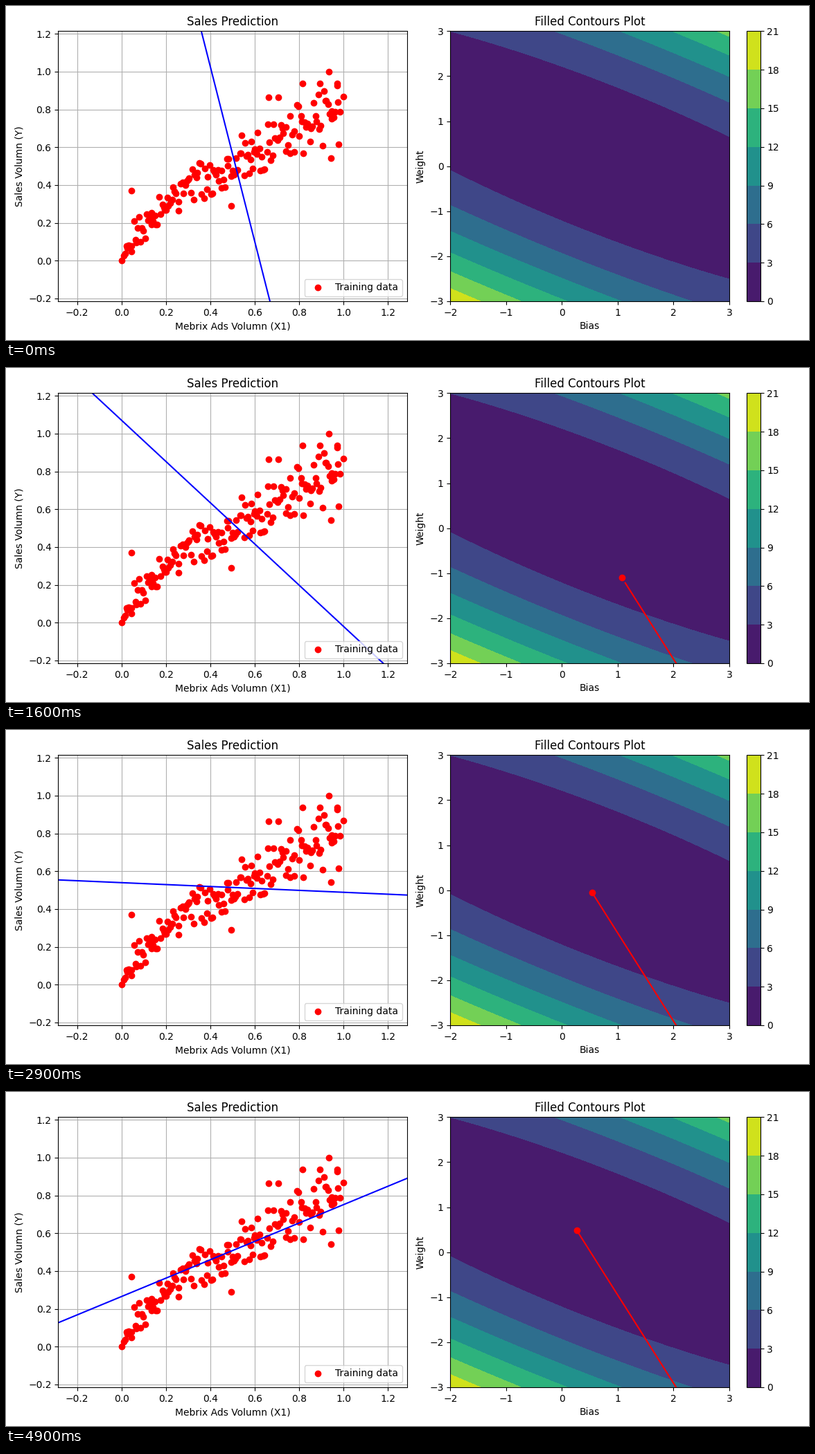
Recreate the animation shown at these times as a matplotlib script. Size 1159x483 px, loop 5 s.

```python
import numpy as np
import matplotlib.pyplot as plt
from matplotlib.animation import FuncAnimation

W, H, DPI = 1159, 483, 100
FRAMES, INTERVAL = 50, 100

# Gradient descent: both parameters decay towards the best fit
W_END, B_END = 0.667, 0.173
W_GAP, RATE, B_PER_W = 5.287, 0.06885, 0.511

# Samples at the rim of the cloud
LANDMARKS = [(0, 0), (.045, .372), (.495, .291), (.592, .489), (.664, .863),
             (.705, .866), (.817, .936), (.895, .936), (.933, 1),
             (.973, .936), (1, .868), (.945, .544), (.977, .617)]


def make_samples(n=152):
    """Evenly jittered x, y scattered around a rising power curve."""
    rng = np.random.default_rng(7)
    x = .005 + .98 * (np.arange(n) + rng.random(n)) / n
    noise = np.clip(rng.normal(size=n), -1.6, 1.6)
    y = .8 * x ** .62 + (.045 + .05 * x) * noise
    return np.vstack([LANDMARKS, np.column_stack([x, y])])


def params(step):
    gap = W_GAP * np.exp(-RATE * np.asarray(step, float))
    return B_END + B_PER_W * gap, W_END - gap


def loss(u, v):
    return (v - .5 + .475 * u) ** 2 + .085 * u ** 2 - .11 * u + .05


def add_axes(left, right, top=36.4, bottom=426.9):
    return fig.add_axes([left / W, 1 - bottom / H,
                         (right - left) / W, (bottom - top) / H])


fig = plt.figure(figsize=(W / DPI, H / DPI), dpi=DPI, facecolor="white")

# Data and fitted line
ax = add_axes(75.3, 578.55)
ax.plot(*make_samples().T, "ro", label="Training data")
fit, = ax.plot([], [], "b-")
ax.set_xlim(.5 - .55 / .7, .5 + .55 / .7)
ax.set_ylim(.5 - .5 / .7, .5 + .5 / .7)
ax.set_title("Sales Prediction")
ax.set_xlabel("Mebrix Ads Volumn (X1)")
ax.set_ylabel("Sales Volumn (Y)")
ax.grid(True)
ax.legend(loc="lower right")

# Loss surface and descent path
surf = add_axes(641.4, 1043.9)
u, v = np.meshgrid(np.linspace(-2, 3, 100), np.linspace(-3, 3, 100))
filled = surf.contourf(u, v, loss(u, v), levels=np.arange(0, 22, 3))
fig.colorbar(filled, cax=add_axes(1069.1, 1088.6))
surf.set_title("Filled Contours Plot")
surf.set_xlabel("Bias")
surf.set_ylabel("Weight")
trail, = surf.plot([], [], "r-")
dot, = surf.plot([], [], "ro")
surf.set_xlim(-2, 3)
surf.set_ylim(-3, 3)

span = np.array([-1.0, 2.0])


def update(i):
    b, w = params(i)
    fit.set_data(span, w * span + b)
    trail.set_data(*params(np.arange(i)))
    dot.set_data([b], [w])
    return fit, trail, dot


def init():
    return update(0)


anim = FuncAnimation(fig, update, frames=FRAMES, init_func=init,
                     interval=INTERVAL, repeat=True, repeat_delay=0)

plt.show()
```
